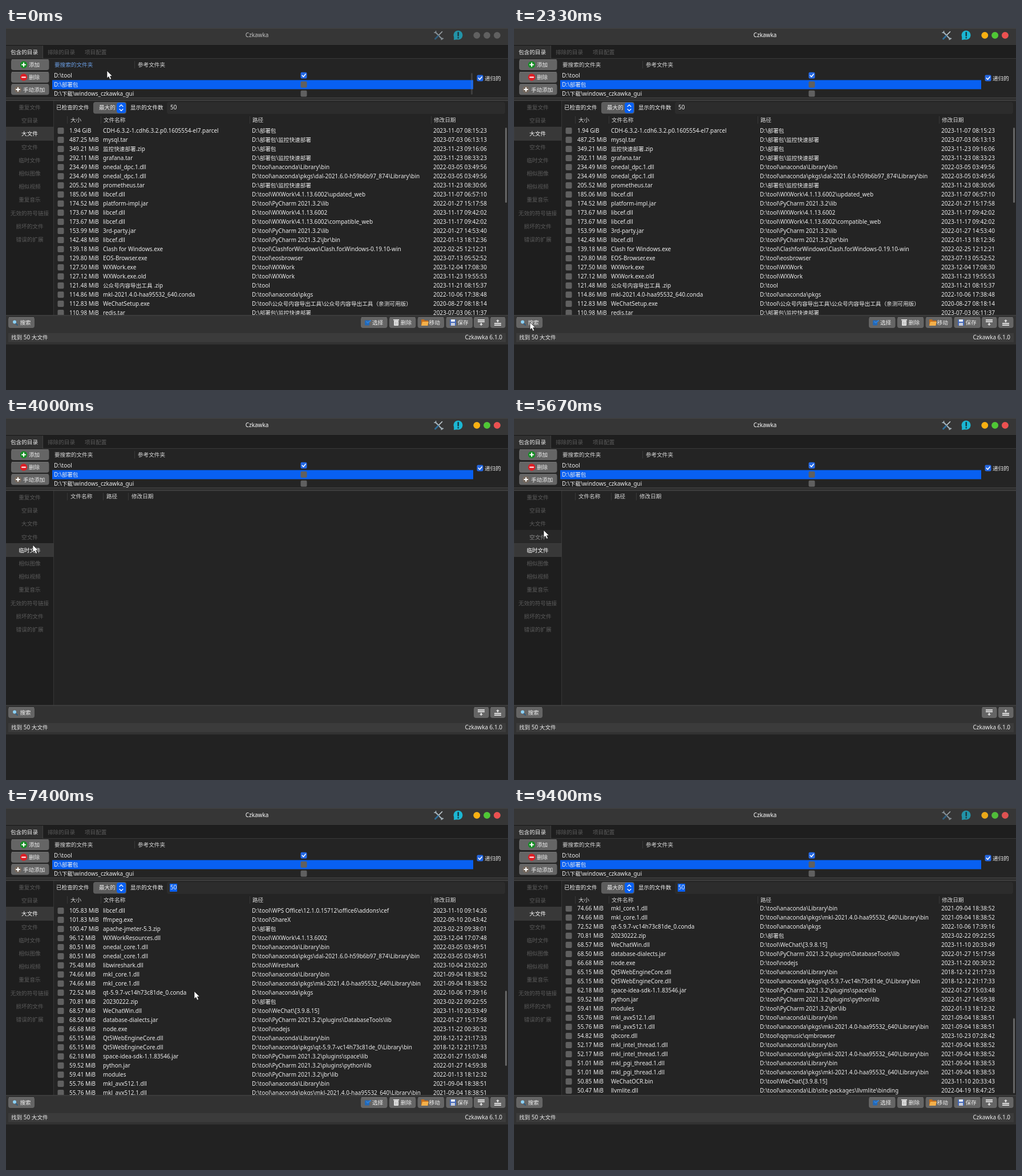
Animation, 880 px wide and 636 px high, one loop 9470 ms. Source, as an HTML page:

```html
<!DOCTYPE html>
<html lang="zh-CN">
<head>
<meta charset="utf-8">
<style>
html, body { margin: 0; width: 100%; height: 100%; overflow: hidden; background: #222; }
svg { display: block; width: 880px; height: 636px; }
text { font: 9.95px "Noto Sans", "Noto Sans CJK SC", sans-serif; fill: #eee; white-space: pre; }
.cjk { font-family: "Noto Sans CJK SC", "Noto Sans CJK", sans-serif; font-size: 9.64px; }
.head { font-weight: 500; fill: #d8d8d8; }
.dim { fill: #5b5b5b; }
.mid { text-anchor: middle; }
.end { text-anchor: end; }
</style>
</head>
<body>
<svg id="stage" viewBox="0 0 880 636"></svg>
<script>
const LOOP = 9470, STEP = 1000 / 15, ROW = 16, TAB = 23.2, TAB_TOP = 127.6;
const VIEW = 332, MAX_SCROLL = 468, WHEEL = 44;
const BLUE = '#0860f2', BOX = '#606060';

const FILES = String.raw`1.94 GiB|CDH-6.3.2-1.cdh6.3.2.p0.1605554-el7.parcel|D:\部署包|2023-11-07 08:15:23
487.25|mysql.tar|D:\部署包\监控快速部署|2023-07-03 06:13:13
349.21|监控快速部署.zip|D:\部署包|2023-11-23 09:16:06
292.11|grafana.tar|D:\部署包\监控快速部署|2023-11-23 08:33:23
234.49|onedal_dpc.1.dll|~\anaconda\Library\bin|2022-03-05 03:49:56
234.49|onedal_dpc.1.dll|~\anaconda\pkgs\dal-2021.6.0-h59b6b97_874\Library\bin|2022-03-05 03:49:56
205.52|prometheus.tar|D:\部署包\监控快速部署|2023-11-23 08:30:06
185.06|libcef.dll|~\WXWork\4.1.13.6002\updated_web|2023-11-07 06:57:10
174.52|platform-impl.jar|~\PyCharm 2021.3.2\lib|2022-01-27 15:17:58
173.67|libcef.dll|~\WXWork\4.1.13.6002|2023-11-17 09:42:02
173.67|libcef.dll|~\WXWork\4.1.13.6002\compatible_web|2023-11-17 09:42:02
153.99|3rd-party.jar|~\PyCharm 2021.3.2\lib|2022-01-27 14:53:40
142.48|libcef.dll|~\PyCharm 2021.3.2\jbr\bin|2022-01-13 18:12:36
139.18|Clash for Windows.exe|~\ClashforWindows\Clash.for.Windows-0.19.10-win|2022-02-25 12:12:21
129.80|EOS-Browser.exe|~\eosbrowser|2023-07-13 05:52:52
127.50|WXWork.exe|~\WXWork|2023-12-04 17:08:30
127.12|WXWork.exe.old|~\WXWork|2023-11-23 19:55:53
121.48|公众号内容导出工具 .zip|~|2023-11-21 08:15:37
114.86|mkl-2021.4.0-haa95532_640.conda|~\anaconda\pkgs|2022-10-06 17:38:48
112.83|WeChatSetup.exe|~\公众号内容导出工具\公众号内容导出工具（亲测可用版）|2020-08-27 08:18:14
110.98|redis.tar|D:\部署包\监控快速部署|2023-07-03 06:11:37
105.84|libcef.dll|~\WPS Office\12.1.0.15990\office6\addons\cef|2023-11-30 17:37:37
105.83|libcef.dll|~\WPS Office\12.1.0.15712\office6\addons\cef|2023-11-10 09:14:26
101.83|ffmpeg.exe|~\ShareX|2022-09-10 20:43:42
100.47|apache-jmeter-5.3.zip|D:\部署包|2023-02-23 09:38:01
96.12|WXWorkResources.dll|~\WXWork\4.1.13.6002|2023-12-04 17:07:48
80.51|onedal_core.1.dll|~\anaconda\Library\bin|2022-03-05 03:49:51
80.51|onedal_core.1.dll|~\anaconda\pkgs\dal-2021.6.0-h59b6b97_874\Library\bin|2022-03-05 03:49:51
75.48|libwireshark.dll|~\Wireshark|2023-10-04 23:02:20
74.66|mkl_core.1.dll|~\anaconda\Library\bin|2021-09-04 18:38:52
74.66|mkl_core.1.dll|~\anaconda\pkgs\mkl-2021.4.0-haa95532_640\Library\bin|2021-09-04 18:38:52
72.52|qt-5.9.7-vc14h73c81de_0.conda|~\anaconda\pkgs|2022-10-06 17:39:16
70.81|20230222.zip|D:\部署包|2023-02-22 09:22:55
68.57|WeChatWin.dll|~\WeChat\[3.9.8.15]|2023-11-10 20:33:49
68.50|database-dialects.jar|~\PyCharm 2021.3.2\plugins\DatabaseTools\lib|2022-01-27 15:17:58
66.68|node.exe|~\nodejs|2023-11-22 00:30:32
65.15|Qt5WebEngineCore.dll|~\anaconda\Library\bin|2018-12-12 21:17:33
65.15|Qt5WebEngineCore.dll|~\anaconda\pkgs\qt-5.9.7-vc14h73c81de_0\Library\bin|2018-12-12 21:17:33
62.18|space-idea-sdk-1.1.83546.jar|~\PyCharm 2021.3.2\plugins\space\lib|2022-01-27 15:03:48
59.52|python.jar|~\PyCharm 2021.3.2\plugins\python\lib|2022-01-27 14:59:38
59.41|modules|~\PyCharm 2021.3.2\jbr\lib|2022-01-13 18:12:32
55.76|mkl_avx512.1.dll|~\anaconda\Library\bin|2021-09-04 18:38:51
55.76|mkl_avx512.1.dll|~\anaconda\pkgs\mkl-2021.4.0-haa95532_640\Library\bin|2021-09-04 18:38:51
54.82|qbcore.dll|~\qqmusic\qmbrowser|2023-10-23 07:28:42
52.17|mkl_intel_thread.1.dll|~\anaconda\Library\bin|2021-09-04 18:38:52
52.17|mkl_intel_thread.1.dll|~\anaconda\pkgs\mkl-2021.4.0-haa95532_640\Library\bin|2021-09-04 18:38:52
51.01|mkl_pgi_thread.1.dll|~\anaconda\Library\bin|2021-09-04 18:38:53
51.01|mkl_pgi_thread.1.dll|~\anaconda\pkgs\mkl-2021.4.0-haa95532_640\Library\bin|2021-09-04 18:38:53
50.85|WeChatOCR.bin|~\WeChat\[3.9.8.15]|2023-11-10 20:33:43
50.47|llvmlite.dll|~\anaconda\Lib\site-packages\llvmlite\binding|2022-04-19 18:47:25`
  .split('\n').map(line => line.replace('~', 'D:\\tool').split('|'));

const TABS = '重复文件 空目录 大文件 空文件 临时文件 相似图像 相似视频 重复音乐 无效的符号链接 损坏的文件 错误的扩展'.split(' ');

// Drawing helpers; text is placed by its vertical centre.
const text = (x, y, s, cls = '', extra = '') =>
  `<text x="${x}" y="${y + 3.8}" class="${cls}" ${extra}>` +
  s.replace(/[\u3000-\u9fff\uff00-\uffef]+/g, '<tspan class="cjk">$&</tspan>') + '</text>';
const rect = (x, y, w, h, fill, r = 0, extra = '') =>
  `<rect x="${x}" y="${y}" width="${w}" height="${h}" rx="${r}" fill="${fill}" ${extra}/>`;
const circle = (x, y, r, fill) => `<circle cx="${x}" cy="${y}" r="${r}" fill="${fill}"/>`;
const line = (d, color, w = 1) =>
  `<path d="${d}" fill="none" stroke="${color}" stroke-width="${w}" stroke-linecap="round" stroke-linejoin="round"/>`;
const shape = (d, fill) => `<path d="${d}" fill="${fill}"/>`;
const group = (id, body) => `<g id="${id}">${body}</g>`;
const check = (x, y, on) => rect(x, y, 11, 11, on ? '#2468e4' : BOX, 2) +
  (on ? line(`M${x + 2.7} ${y + 5.5}l2.2 2.4 3.8-4.6`, '#fff', 1.6) : '');
const button = (x, y, w, h = 19) => rect(x, y, w, h, '#656565', 4) + rect(x + 1, y, w - 2, 1, '#737373');
const dots = colors => colors.map((color, i) => circle(825.3 + 17.8 * i, 12.8, 5.9, color)).join('');
const columns = (y, seps, labels) =>
  seps.map(x => rect(x, y - 6, 1, 13, '#393939')).join('') +
  labels.map(([x, s]) => text(x, y, s, 'head')).join('');

function titleBar() {
  const tools = line('M753 7.5l11.5 12', '#a3b1b9', 2.2) + line('M764.5 6.5l-6 6', '#c2ccd2', 1.6) +
    line('M757.5 14l-5 5', '#2f6d98', 3) + line('M750.8 8l2.4 .4.4-2.8M763 20.5l1-2.5 2.5 .5', '#a3b1b9', 1.5);
  const info = circle(792.5, 12.5, 8, '#1bb7d3') + shape('M785.5 15l-.5 6 7-1z', '#1bb7d3') +
    line('M792.7 8v5.5M792.7 17v.3', '#17333c', 2.4);
  return rect(0, 0, 880, 30, '#363636') + rect(0, 0, 880, 1, '#444') +
    text(440, 12.5, 'Czkawka', 'mid', 'id="title"') + group('icons', tools + info) +
    dots(['#606060', '#606060', '#606060']) + group('dots', dots(['#f9b011', '#4fc735', '#ec5050']));
}

function folders() {
  const side = [['添加', 55, '#168c25', 40, 31], ['删除', 77, '#db1f26', 40, 31], ['手动添加', 98.5, '#75695f', 30, 21]]
    .map(([label, y, color, tx, ix], i) => button(9, y, 66.5) + circle(ix, y + 9.5, 6.2, color) +
      line(`M${ix - 3} ${y + 9.5}h6` + (i === 1 ? '' : `M${ix} ${y + 6.5}v6`), '#fff', 2) + text(tx, y + 9.5, label)).join('');
  return rect(0, 30, 880, 24, '#1e1e1e') + rect(0, 30, 880, 1, '#171717') + rect(0, 53, 880, 1, '#393939') +
    rect(0, 31, 65, 23, '#303030') + rect(64, 31, 1, 23, '#414141') +
    text(8, 42, '包含的目录') + text(73, 42, '排除的目录', 'dim') + text(138, 42, '项目配置', 'dim') + side +
    text(85, 64.5, '要搜索的文件夹', 'head', 'id="folderHead"') + rect(225, 58, 1, 13, '#393939') +
    text(231, 64.5, '参考文件夹', 'head') + rect(81, 91.5, 738, 16, BLUE) +
    ['D:\\tool', 'D:\\部署包', 'D:\\下载\\windows_czkawka_gui'].map((s, i) =>
      text(84, 83 + ROW * i, s) + check(516.5, 77.8 + ROW * i, i === 0)).join('') +
    rect(815, 79, 3, 38, '#8a8a8a', 1.5, 'id="folderBar"') + check(825.5, 82.5, true) + text(839, 88, '递归的') +
    rect(0, 122, 880, 6, '#303030') + rect(0, 122, 880, 1, '#414141') + rect(0, 127, 880, 1, '#494949');
}

function sidebar() {
  return rect(0, 128, 83, 377, '#1e1e1e') + rect(83, 128, 1, 377, '#373737') +
    TABS.map((s, i) => `<g class="tab">${rect(0, TAB_TOP + TAB * i, 83, TAB, '#383838', 0, 'stroke="#424242" stroke-width=".7"')}` +
      text(41.5, TAB_TOP + TAB * (i + .5), s, 'mid') + '</g>').join('');
}

function bigFiles() {
  const rows = FILES.map(([size, name, path, date], i) => {
    const y = 180 + ROW * i;
    return check(90.5, y - 5, false) + text(111, y, size.includes('GiB') ? size : size + ' MiB') +
      text(170, y, name) + text(431, y, path) + text(749, y, date);
  }).join('');
  return text(88, 139.5, '已检查的文件') + rect(153, 130, 58, 20.5, '#5d5d5d', 4) + text(163, 139.5, '最大的') +
    rect(194, 131, 16, 18.5, BLUE, 4) + line('M199 138l3-3 3 3M199 142.5l3 3 3-3', '#fff', 1.2) +
    text(218, 139.5, '显示的文件数') + rect(282, 130, 593, 21, '#2c2c2c', 4) +
    rect(287, 133, 13, 14, BLUE, 0, 'id="picked"') + text(288, 139.5, '50') +
    columns(161, [107, 166, 427, 745], [[113, '大小'], [171, '文件名称'], [432, '路径'], [750, '修改日期']]) +
    `<g clip-path="url(#view)">${group('rows', rows)}</g>` + rect(875, 175, 3, 132, '#666', 1.5, 'id="thumb"');
}

function actions() {
  const icons = [
    rect(629, 513.5, 8, 9, '#2369b8', 1) + line('M632 516l2 2 5-4', '#2f80da', 2),
    rect(680, 514, 8, 9, '#e3e3e3', 1) + rect(679, 512, 10, 1.5, '#fff') + line('M682.5 516v5M685.5 516v5', '#999', .8),
    shape('M728 512h5l1 2h6v9h-12z', '#c8701b') + shape('M730 516h11l-2 7h-11z', '#f4b04a'),
    rect(778, 512, 11, 11, '#4368b8', 1) + rect(780, 512, 7, 4, '#e7edf8') + rect(780, 518, 7, 5, '#c5cbdc')];
  const sized = ['选择', '删除', '移动', '保存'].map((s, i) => {
    const x = 622 + 49.8 * i;
    return button(x, 508, 46.5) + icons[i] + text(x + 20, 517.5, s);
  }).join('');
  return rect(0, 504.5, 880, 52, '#323232') + rect(0, 504.5, 880, 1, '#484848') +
    button(4, 508, 46) + line('M17 519l3 3', '#305a7c', 2) + circle(15, 516.5, 3, '#8bd0f4') + text(24.5, 517.5, '搜索') +
    group('fileActions', sized) + button(820, 508, 26.5) + button(849, 508, 26.5) +
    rect(827, 512, 12, 2, '#ddd') + rect(827, 515, 12, 2, '#ddd') + shape('M832 518h2v2h2l-3 3-3-3h2z', '#ddd') +
    shape('M862 512l3 3h-2v2h-2v-2h-2z', '#ddd') + rect(856, 518, 12, 2, '#ddd') + rect(856, 521, 12, 2, '#ddd') +
    rect(4, 536, 872, 16, '#3b3b3b') + text(9, 543.5, '找到 50 大文件') + text(870, 543.5, 'Czkawka 6.1.0', 'end') +
    rect(0, 556, 880, 80, '#222');
}

const stage = document.getElementById('stage');
stage.innerHTML = `<defs><clipPath id="view">${rect(84, 172, 796, VIEW, '#000')}</clipPath></defs>` +
  rect(0, 0, 880, 636, '#242424') + titleBar() + folders() + sidebar() + group('big', bigFiles()) +
  group('temp', columns(137.5, [107, 170, 214], [[113, '文件名称'], [176, '路径'], [220, '修改日期']])) + actions() +
  group('cursor', '<path d="M0 0V13.2L3 10.5L5.2 15.4L7.6 14.3L5.5 9.6H9.5Z" fill="#fff" stroke="#111" stroke-width=".7"/>');

const $ = id => document.getElementById(id);
const tabs = [...document.querySelectorAll('.tab')];

// Each key is [time, ...values].
const PATH = [[0, 178, 73], [330, 120, 240], [700, 20, 530], [1000, 12, 513], [1400, 30, 517], [1670, 28, 517],
  [2330, 28, 517], [2870, 331, 394], [3270, 65, 260], [3600, 46, 230], [3900, 46, 230], [4270, 49, 206],
  [4330, 47, 227], [4470, 47, 227], [4800, 47, 242], [5400, 47, 242], [5670, 52, 197], [5870, 46, 180],
  [6500, 45, 180], [6800, 275, 260], [7070, 290, 275], [7400, 330, 322], [8070, 330, 322],
  [8330, 150, 400], [8670, 740, 518], [8870, 760, 600]];
const SCROLL = [[6720, 0], [6800, 44], [7000, 44], [7400, 352], [7900, 484]];
const FOCUS = [[1870, 0], [2130, 1], [9335, 1], [9400, .9]];
const FOLDER_BAR = [[0, .25], [200, .8], [1930, .8], [2130, 0]];
const THUMB = [[5860, 1], [5870, 0], [6730, 0], [6930, 1]];

function at(keys, t) {
  const next = keys.findIndex(k => k[0] > t);
  if (next < 1) return keys[next === 0 ? 0 : keys.length - 1].slice(1);
  const a = keys[next - 1], b = keys[next], p = (t - a[0]) / (b[0] - a[0]);
  return a.slice(1).map((v, i) => v + (b[i + 1] - v) * p);
}

function draw(t) {
  const [x, y] = at(PATH, t), [focus] = at(FOCUS, t);
  const scroll = Math.min(MAX_SCROLL, Math.round(at(SCROLL, t)[0] / WHEEL) * WHEEL);
  const big = t < 3660 || t >= 5860, selected = big ? 2 : 4;
  const hover = x < 83 && y > TAB_TOP && y < 380 ? Math.floor((y + 1 - TAB_TOP) / TAB) : -1;

  $('cursor').setAttribute('transform', `translate(${Math.round(x)} ${Math.round(y)})`);
  $('cursor').style.display = t < 8900 ? '' : 'none';
  $('dots').style.opacity = focus;
  $('icons').style.opacity = focus < 1 ? .72 : 1;
  $('title').style.fill = focus > .5 ? '#fff' : '#c4c4c4';
  $('folderBar').style.opacity = at(FOLDER_BAR, t)[0];
  $('folderHead').style.fill = x > 81 && x < 225 && y > 55 && y < 75 ? '#6a9de2' : '#d8d8d8';
  $('big').style.display = $('fileActions').style.display = big ? '' : 'none';
  $('temp').style.display = big ? 'none' : '';
  $('picked').style.display = t > 5800 ? '' : 'none';
  $('rows').setAttribute('transform', `translate(0 ${-scroll})`);
  $('thumb').setAttribute('y', 175 + scroll * VIEW / 800);
  $('thumb').style.opacity = at(THUMB, t)[0];
  tabs.forEach((tab, i) => {
    tab.firstChild.style.opacity = i === selected ? 1 : i === hover ? .4 : 0;
    tab.lastChild.style.fill = i === selected ? '#fff' : i === hover ? '#8c8c8c' : '#5b5b5b';
  });
}

const start = performance.now();
function tick() {
  const t = (performance.now() - start) % LOOP;
  draw(Math.floor(t / STEP) * STEP + 3);
  requestAnimationFrame(tick);
}
tick();
</script>
</body>
</html>
```
